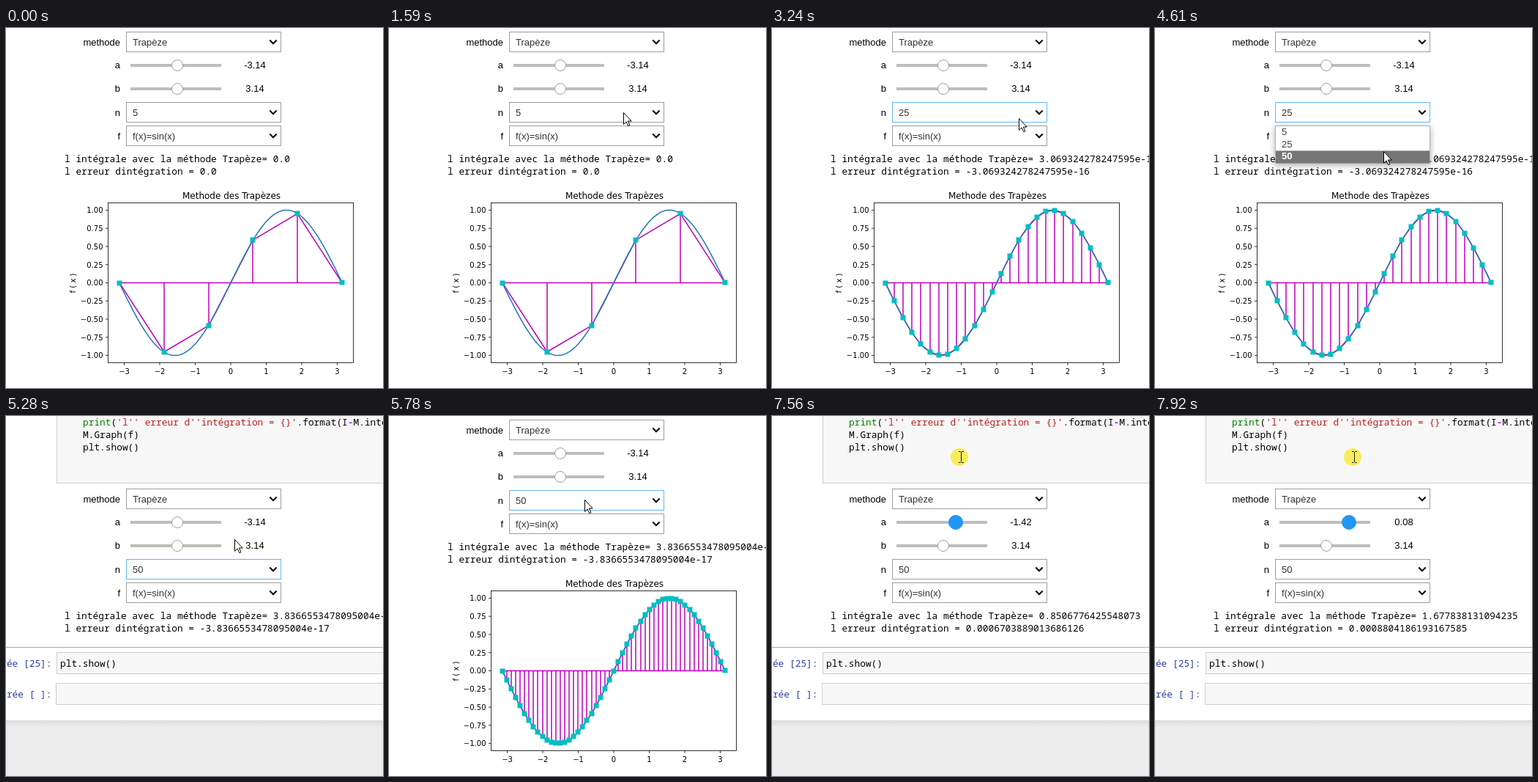
An HTML page for the animation above (7.99 s loop, 515 by 491 pixels).

```html
<!DOCTYPE html>
<html lang="fr">
<head>
<meta charset="utf-8">
<style>
html, body { margin: 0; width: 100%; height: 100%; overflow: hidden; background: #fff; }
svg { display: block; }
.ui { font: 13px "Liberation Sans", Arial, sans-serif; }
.mono { font: 12.83px "Noto Sans Mono", monospace; }
.fig { font: 10px "DejaVu Sans", sans-serif; }
.end { text-anchor: end; }
.mid { text-anchor: middle; }
.str { fill: #ba2121; }
.fn { fill: #008000; }
.op { fill: #aa22ff; font-weight: bold; }
.prompt { fill: #303f9f; text-anchor: end; }
.cell { fill: #f7f7f7; stroke: #cfcfcf; }
.thin { fill: none; stroke: #000; stroke-width: .8; }
#glow { mix-blend-mode: multiply; }
</style>
</head>
<body>
<svg width="515" height="491" viewBox="0 0 515 491">
  <defs>
    <linearGradient id="edge" x1="0" y1="0" x2="0" y2="1">
      <stop offset="0" stop-color="#dcdcdc"/><stop offset="1" stop-color="#ededed"/>
    </linearGradient>
    <filter id="shadow" x="-20%" y="-50%" width="140%" height="200%">
      <feDropShadow dx="0" dy="2" stdDeviation="4" flood-color="#000" flood-opacity=".35"/>
    </filter>
  </defs>
  <rect width="515" height="491" fill="#fff"/>
  <g id="page">
    <rect class="cell" x="69.5" y="-120.5" width="460" height="118"/>
    <g class="mono">
      <text x="105" y="-81"><tspan class="fn">print</tspan>(<tspan class="str">'l'' erreur d''intégration = {}'</tspan>.format(I<tspan class="op">-</tspan>M.integrale(f))</text>
      <text x="105" y="-64">M.Graph(f)</text>
      <text x="105" y="-47">plt.show()</text>
    </g>
    <g id="form" class="ui"></g>
    <g class="mono">
      <text id="line1" x="80" y="183"></text>
      <text id="line2" x="80" y="200"></text>
    </g>
    <g id="plot" class="fig"></g>
    <g id="below" class="mono">
      <path d="M0 221.5H515" stroke="#ababab"/>
      <rect class="cell" x="69.5" y="228.5" width="460" height="29"/>
      <text class="prompt" x="62.5" y="248">Entrée [25]:</text>
      <text x="74" y="248">plt.show()</text>
      <rect class="cell" x="68.5" y="270.5" width="460" height="29"/>
      <text class="prompt" x="62.5" y="290">Entrée [ ]:</text>
      <rect y="321" width="515" height="90" fill="#ededed"/>
      <rect y="321" width="515" height="10" fill="url(#edge)"/>
    </g>
  </g>
  <g id="menu" class="ui">
    <rect x="164.5" y="133.5" width="211" height="51" fill="#fff" stroke="#b5b5b5" filter="url(#shadow)"/>
    <rect id="hover" x="165" width="210" height="17" fill="#767676"/>
  </g>
  <g id="pointer">
    <circle id="glow" r="12" fill="#fff45e"/>
    <path id="arrow" d="M.5 .5V16.3L4.1 12.9L6.8 18.7L9 17.7L6.4 12H11.2Z" fill="#fff" stroke="#000"/>
    <path id="beam" d="M-1 -7.5H1.5L2.5 -6.5L3.5 -7.5H6M2.5 -7V7M-1 7.5H1.5L2.5 6.5L3.5 7.5H6" fill="none" stroke="#222"/>
  </g>
</svg>
<script>
const LOOP = 7990, SCROLL = 94, PRESS = 6900, FOCUS = 1990, B = 3.14;
const $ = id => document.getElementById(id);
const show = (el, on) => el.setAttribute('visibility', on ? 'visible' : 'hidden');
const clamp = v => Math.max(0, Math.min(1, v));
const latest = (rows, t) => rows.filter(r => r.t <= t).pop();

// pointer tip: time, x, y
const path = [
  [320, 472, 329], [500, 430, 262], [700, 355, 150], [900, 290, 72], [1000, 281, 61],
  [1090, 287, 67], [1300, 306, 98], [1450, 318, 120], [1590, 320, 115], [1789, 320, 115],
  [1790, 319, 114], [2260, 319, 114], [2800, 333, 158], [3069, 333, 158], [3240, 337, 123],
  [3510, 335, 108], [3860, 335, 108], [4540, 312, 167], [4610, 312, 168], [5360, 312, 168],
  [6060, 238, 78], [6130, 237, 76], [6390, 237, 76], [6800, 237, 61], [6900, 239, 56],
  [7140, 239, 56], [7900, 270, 56]
];

// results printed by the notebook; the page is short until the figure is back
const runs = [
  { t: 0, back: 0, n: 5, a: -B, sum: '0.0', err: '0.0' },
  { t: 3070, back: 3240, n: 25, a: -B, sum: '3.069324278247595e-16', err: '-3.069324278247595e-16' },
  { t: 5280, back: 5430, n: 50, a: -B, sum: '3.8366553478095004e-17', err: '-3.8366553478095004e-17' },
  { t: 7210, back: 7420, n: 50, a: -2.52 },
  { t: 7560, back: 7700, n: 50, a: -1.72 },
  { t: 7850, back: LOOP, n: 50, a: -.82, sum: '1.677838131094235', err: '0.0008804186193167585' }
];
const picks = [{ t: 0, row: 0 }, { t: 2800, row: 1 }, { t: 4940, row: 2 }];
const menus = [[1990, 2800], [3790, 4940]];
const options = ['5', '25', '50'];

function select(y, label, value, id) {
  return `<text class="end" x="156" y="${y + 19}">${label}</text>
    <rect id="${id}Box" x="164.5" y="${y + .5}" width="211" height="27" fill="#fff" stroke="#9e9e9e"/>
    <text id="${id}" x="173" y="${y + 19}" fill="#333">${value}</text>
    <path d="M360.3 ${y + 11.5}l4.7 4.7l4.7 -4.7" fill="none" stroke="#111" stroke-width="2.2"/>`;
}
function slider(y, label, value, id) {
  return `<text class="end" x="156" y="${y + 4}">${label}</text>
    <rect x="170" y="${y - 2}" width="124" height="4" fill="#bdbdbd"/>
    <circle id="${id}Knob" cx="234" cy="${y}" r="7.5" fill="#fff" stroke="#9e9e9e"/>
    <text class="mid" id="${id}" x="340" y="${y + 4}">${value}</text>`;
}
$('form').innerHTML = select(5, 'methode', 'Trapèze', 'method') + slider(51, 'a', '-3.14', 'a') +
  slider(83, 'b', '3.14', 'b') + select(101, 'n', '5', 'n') + select(133, 'f', 'f(x)=sin(x)', 'f');
$('menu').insertAdjacentHTML('beforeend', options.map((o, i) =>
  `<text class="option" x="173" y="${146 + 16.7 * i}">${o}</text>`).join(''));
const optionEls = document.querySelectorAll('.option');

function drawPlot({ n, a }) {
  const line = count => Array.from({ length: count + 1 }, (_, i) => {
    const x = a + (B - a) * i / count;
    return [x, Math.sin(x)];
  });
  const curve = line(200), ys = curve.map(p => p[1]);
  const lo = Math.min(...ys), hi = Math.max(...ys);
  const px = x => 139.5 + 335 * ((x - a) / (B - a) + .05) / 1.1;
  const py = y => 456.5 - 218 * ((y - lo) / (hi - lo) + .05) / 1.1;
  const nodes = line(n).map(([x, y]) => [Math.round(px(x)), py(y)]);
  const zero = py(0).toFixed(2);
  const traps = nodes.slice(1).map(([x, y], i) =>
    `M${nodes[i][0]} ${zero}V${nodes[i][1]}L${x} ${y}V${zero}Z`).join('');
  const sign = s => s.replace('-', '\u2212');
  let marks = '';
  for (let v = -3; v <= 3; v++) {
    const x = px(v);
    if (x >= 139 && x <= 475)
      marks += `<path class="thin" d="M${x} 456.5v3.5"/><text class="mid" x="${x}" y="471.5">${sign('' + v)}</text>`;
  }
  for (let v = -1; v <= 1; v += .25) {
    const y = py(v);
    if (y >= 238 && y <= 457)
      marks += `<path class="thin" d="M139.5 ${y}h-3.5"/><text class="end" x="132.5" y="${y + 3.9}">${sign(v.toFixed(2))}</text>`;
  }
  $('plot').innerHTML = `
    <path d="${traps}" fill="none" stroke="#bf00bf" stroke-width="1.5" stroke-linejoin="round"/>
    <polyline points="${curve.map(([x, y]) => px(x) + ',' + py(y)).join(' ')}" fill="none" stroke="#1f77b4" stroke-width="1.5"/>
    ${nodes.map(([x, y]) => `<rect x="${x - 3.5}" y="${Math.round(y) - 3.5}" width="7" height="7" fill="#00bfbf"/>`).join('')}
    ${marks}<rect class="thin" x="139.5" y="238.5" width="335" height="218"/>
    <text class="mid" x="308" y="232.5" font-size="12">Methode des Trapèzes</text>
    <text class="mid" transform="translate(95 348) rotate(-90)">f ( x )</text>`;
}

function print(run) {
  let { n, a, sum, err } = run;
  if (!sum) {
    const h = (B - a) / n;
    sum = 0;
    for (let i = 0; i < n; i++) sum += h * (Math.sin(a + i * h) + Math.sin(a + (i + 1) * h)) / 2;
    err = Math.cos(a) - Math.cos(B) - sum;
  }
  $('line1').textContent = 'l intégrale avec la méthode Trapèze= ' + sum;
  $('line2').textContent = 'l erreur dintégration = ' + err;
}

function pointerAt(t) {
  const i = path.findIndex(k => k[0] > t);
  if (i < 0) return path[path.length - 1].slice(1);
  if (i === 0) return path[0].slice(1);
  const [t0, x0, y0] = path[i - 1], [t1, x1, y1] = path[i];
  const k = (t - t0) / (t1 - t0);
  return [Math.round(x0 + (x1 - x0) * k), Math.round(y0 + (y1 - y0) * k)];
}

let current;
function render(t) {
  const run = latest(runs, t), short = t < run.back;
  if (run !== current) {
    current = run;
    drawPlot(run);
    print(run);
  }
  $('page').setAttribute('transform', `translate(0 ${short ? SCROLL : 0})`);
  show($('plot'), !short);
  show($('below'), short);

  const [x, y] = pointerAt(t), pressed = t >= PRESS;
  const row = latest(picks, t).row;
  $('n').textContent = options[row];
  $('nBox').setAttribute('stroke', t >= FOCUS && !pressed ? '#64b5f6' : '#9e9e9e');

  const drag = pressed ? x - 239 : 0;
  const steps = Math.round((6.28 + drag * .104) / .1);
  $('a').textContent = drag ? (-9.42 + steps * .1).toFixed(2) : '-3.14';
  const knob = $('aKnob');
  knob.setAttribute('cx', 234 + drag);
  knob.setAttribute('r', pressed ? 9.5 : 7.5);
  knob.setAttribute('fill', pressed ? '#2196f3' : '#fff');
  knob.setAttribute('stroke', pressed ? '#2196f3' : '#9e9e9e');

  const alpha = Math.max(...menus.map(([open, close]) =>
    Math.min(clamp((t - open + 70) / 140) * (t >= open), clamp(1 - (t - close) / 140))));
  $('menu').setAttribute('opacity', alpha);
  const over = y < 134 ? row : Math.min(2, Math.floor((y - 134) / 17));
  $('hover').setAttribute('y', 134 + 16.7 * over);
  optionEls.forEach((el, i) => {
    el.setAttribute('fill', i === over ? '#fff' : '#444');
    el.setAttribute('font-weight', i === over ? 'bold' : 'normal');
  });

  $('pointer').setAttribute('transform', `translate(${x} ${y})`);
  const seen = t >= path[0][0], text = short && y < 92;
  show($('glow'), seen && pressed);
  show($('arrow'), seen && !text);
  show($('beam'), seen && text);
}

const start = performance.now();
function tick() {
  render((performance.now() - start) % LOOP);
  requestAnimationFrame(tick);
}
tick();
</script>
</body>
</html>
```
